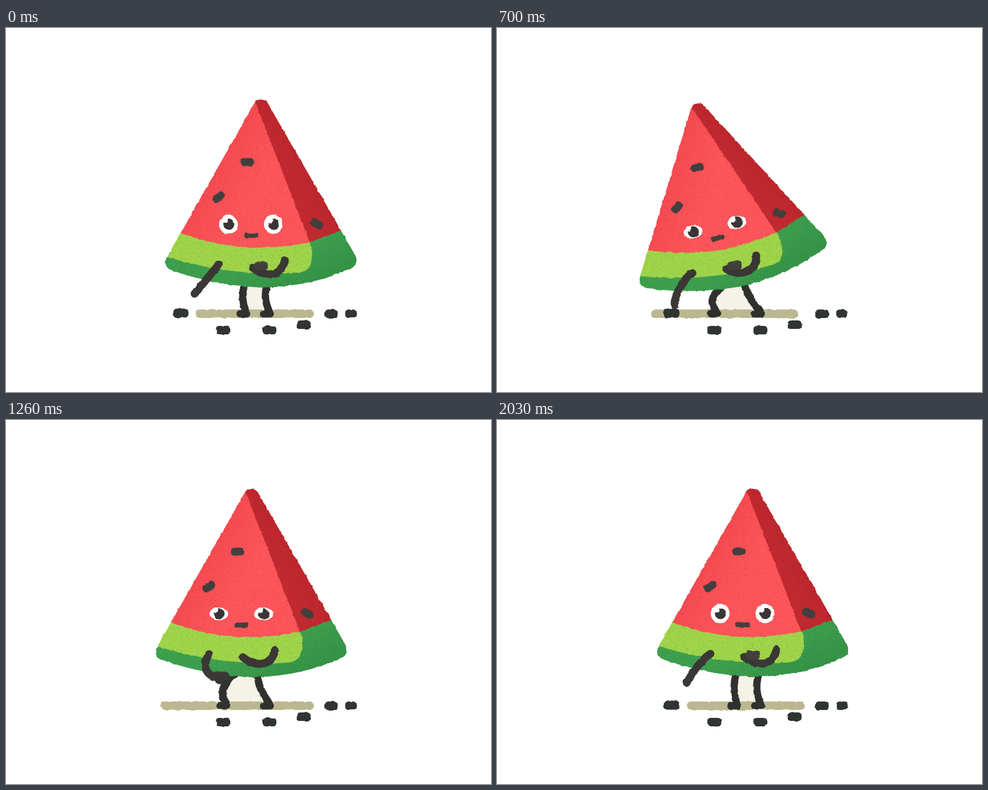
These frames come from a looping animation (800 by 600 pixels, 2100 ms). An HTML page:

```html
<!DOCTYPE html>
<html lang="en">
<head>
<meta charset="utf-8">
<title>Watermelon slice picking up seeds</title>
<style>
html, body { margin: 0; height: 100%; overflow: hidden; background: #fff; }
svg { display: block; width: 800px; height: 600px; }
.limb { fill: none; stroke: #3a3735; stroke-width: 13; stroke-linecap: round; stroke-linejoin: round; }
.leg { stroke: #30312e; stroke-width: 12; }
.seed { fill: #2f3530; }
.pip { fill: #433f3e; }
</style>
</head>
<body>
<svg viewBox="0 0 800 600">
  <defs>
    <filter id="rough" filterUnits="userSpaceOnUse" x="200" y="80" width="420" height="450" color-interpolation-filters="sRGB">
      <feTurbulence id="noise" type="fractalNoise" baseFrequency=".11" numOctaves="2"/>
      <feDisplacementMap in="SourceGraphic" scale="3.5" xChannelSelector="R" yChannelSelector="G"/>
    </filter>
    <filter id="grain" filterUnits="userSpaceOnUse" x="240" y="100" width="360" height="350" color-interpolation-filters="sRGB">
      <feTurbulence type="fractalNoise" baseFrequency=".7" numOctaves="2"/>
      <feColorMatrix values="0 0 0 0 .1  0 0 0 0 .05  0 0 0 0 .05  .7 0 0 0 -.38"/>
      <feComposite in2="SourceGraphic" operator="in" result="specks"/>
      <feMerge><feMergeNode in="SourceGraphic"/><feMergeNode in="specks"/></feMerge>
    </filter>
    <linearGradient id="flesh" gradientUnits="userSpaceOnUse" x1="335" y1="245" x2="400" y2="282">
      <stop stop-color="#f84b51"/><stop offset="1" stop-color="#ff565b"/>
    </linearGradient>
    <linearGradient id="side" gradientUnits="userSpaceOnUse" x1="470" y1="250" x2="505" y2="230">
      <stop stop-color="#c32a30"/><stop offset="1" stop-color="#bd272d"/>
    </linearGradient>
    <linearGradient id="rind" gradientUnits="userSpaceOnUse" x1="500" y1="350" x2="530" y2="420">
      <stop stop-color="#3ea14f"/><stop offset="1" stop-color="#349345"/>
    </linearGradient>
    <clipPath id="slice"><path id="outline" d="M409 125Q412 118 419 118Q429 117 433 126L577 376Q582 390 570 396Q500 428 420 428Q340 424 272 399Q260 394 264 380Z"/></clipPath>
  </defs>
  <g filter="url(#rough)">
    <path id="gap" fill="#f5f2e7"/>
    <path id="shadow" fill="none" stroke="#bbb891" stroke-width="14" stroke-linecap="round"/>
    <path id="leg1" class="limb leg"/>
    <path id="leg2" class="limb leg"/>
    <g id="seeds"></g>
    <g id="body">
      <g clip-path="url(#slice)" filter="url(#grain)">
        <use href="#outline" fill="url(#rind)"/>
        <path fill="#a1d64b" d="M255 374Q330 398 400 403Q440 407 480 404Q502 402 504 382Q507 365 501 353L400 300L270 330Z"/>
        <path fill="url(#flesh)" d="M411 110L280 335Q340 358 400 362Q455 363 501 353Z"/>
        <path fill="url(#side)" d="M409 110L411 122L501 353L565 329L440 105Z"/>
      </g>
      <g id="pips"></g>
      <g id="eyes"></g>
      <rect class="pip" x="393" y="338" width="23" height="8" rx="3"/>
      <path class="limb" d="M460 383C456 400 447 406 434 406Q419 406 407 395"/>
      <rect id="held" class="pip" x="-12" y="-7.5" width="24" height="15" rx="6"/>
    </g>
    <rect id="loose" class="seed" x="-13" y="-7.5" width="26" height="15" rx="6"/>
    <path id="arm" class="limb"/>
  </g>
</svg>
<script>
const LOOP = 2100, STEP = 70, PICK = 980, DROP = 1330, REST = 2030;
const $ = id => document.getElementById(id);
const set = (id, name, value) => $(id).setAttribute(name, value);
const mix = (a, b, u) => a + (b - a) * u;
const ease = (from, to, t) => {
  const u = Math.min(1, Math.max(0, (t - from) / (to - from)));
  return u * u * (3 - 2 * u);
};

// [time, x, y]: reach, press down, lift, tuck in, reach again
const handPath = [[210, 311, 438], [490, 297, 444], [840, 291, 464], [PICK, 291, 464],
  [1260, 362, 422], [1540, 389, 407], [1820, 341, 438], [REST, 313, 433], [LOOP, 311, 438]];

function handAt(t) {
  let [, x, y] = handPath[0];
  for (let i = 1; i < handPath.length; i++) {
    const u = ease(handPath[i - 1][0], handPath[i][0], t);
    if (u > 0) [x, y] = [1, 2].map(c => mix(handPath[i - 1][c], handPath[i][c], u));
  }
  return [x, y];
}

// The seed lies still, rides in the hand, then falls and hops back to its place.
function looseSeed(t, [hx, hy]) {
  if (t <= PICK || t >= REST) return [288, 470, 0];
  if (t < DROP) return [hx - 3, hy + 6, 0];
  const u = (t - DROP) / (REST - DROP);
  const height = u < .2 ? 48 * (1 - 25 * u * u) : 12 * Math.abs(Math.sin(2.5 * Math.PI * (u - .2)));
  return [mix(341, 288, u), 470 - height, 16 * Math.sin(2 * Math.PI * u)];
}

// The elbow sticks out more the closer the hand is to the shoulder.
function armPath([sx, sy], [hx, hy]) {
  const dx = hx - sx, dy = hy - sy, d = Math.hypot(dx, dy);
  const bulge = .62 * Math.sqrt(Math.max(0, 62 * 62 - d * d)) / d;
  const point = u => `${sx + dx * u - dy * bulge} ${sy + dy * u + dx * bulge}`;
  return `M${sx} ${sy}C${point(.2)} ${point(.8)} ${hx} ${hy}`;
}

const seed = (cls, x, y, w, h, angle) =>
  `<rect class="${cls}" x="${-w / 2}" y="${-h / 2}" width="${w}" height="${h}" rx="5.5" transform="translate(${x} ${y}) rotate(${angle})"/>`;

$("seeds").innerHTML = [[358.5, 498, 23], [434.5, 498, 23], [491, 489, 23], [536, 471, 22], [569, 471, 19]]
  .map(([x, y, w]) => seed("seed", x, y, w, 14, 0)).join("");
$("pips").innerHTML = [[398, 221, 0], [350.5, 279, -35], [513, 323, 28]]
  .map(([x, y, angle]) => seed("pip", x, y, 22, 13, angle)).join("");
$("eyes").innerHTML = [367, 441].map(x =>
  `<ellipse class="white" cx="${x}" cy="323.5" rx="15.5" fill="#fff"/>
   <circle cx="${x + .5}" cy="323.5" r="9.2" fill="#3a3635"/>
   <circle cx="${x - 5.5}" cy="317.5" r="4.5" fill="#fff"/>`).join("");

function draw(t) {
  const step = ease(210, 490, t) - ease(1300, 1700, t);
  const bend = ease(280, 910, t) - ease(PICK, 1260, t);
  const swing = ease(1260, 1540, t) - ease(1540, 1820, t);
  const hop = ease(1820, 1925, t) - ease(1925, LOOP, t);
  const squint = ease(140, 280, t) - ease(1540, 1680, t);
  const spread = ease(210, 910, t) - ease(PICK, 1900, t);
  const pass = ease(770, 1190, t) - ease(1260, 1470, t);

  const bx = 421 - 16 * step - 27.5 * bend * bend + 4 * swing + 3 * hop;
  const by = 385 - 4 * step + 7 * bend * bend + swing - 13 * hop;
  const angle = 6.5 * swing - 16 * bend, rad = angle * Math.PI / 180;
  const attach = (x, y) =>
    [bx + x * Math.cos(rad) - y * Math.sin(rad), by + x * Math.sin(rad) + y * Math.cos(rad)];
  set("body", "transform",
    `translate(${bx} ${by}) rotate(${angle}) skewX(${-angle / 10}) translate(-421 -385)`);
  document.querySelectorAll(".white").forEach(e => e.setAttribute("ry", 16 - 5.5 * squint));
  set("shadow", "d", `M${320 - 75 * spread} 471H${501 - 14 * bend + 9 * swing}`);

  const legs = [
    { hip: attach(-28, 38), x: 391 - 33 * step, y: 471 - 7 * Math.sin(Math.PI * step), bulge: 7 + 15 * step },
    { hip: attach(10, 38), x: 430, y: 471, bulge: 9 }
  ];
  legs.forEach((leg, i) => {
    const { hip, x, y, bulge } = leg;
    leg.knee = [(hip[0] + x + 4) / 2 - bulge, (hip[1] + y - 5) / 2];
    set("leg" + (i + 1), "d", `M${hip}Q${leg.knee} ${x + 4} ${y - 5}M${x - 5} ${y}h11`);
  });

  const hand = handAt(t), shoulder = attach(-70, 5), [a, b] = legs;
  const planted = hand[1] > 460 ? `M${shoulder}L${hand}H${a.x}L${a.hip}Z` : "";
  set("gap", "d", `M${a.hip}Q${a.knee} ${a.x + 4} 467H${b.x + 2}Q${b.knee} ${b.hip}Z` + planted);
  set("arm", "d", armPath(shoulder, hand));

  const place = (id, x, y, turn) => set(id, "transform", `translate(${x} ${y}) rotate(${turn})`);
  place("loose", ...looseSeed(t, hand));
  place("held", mix(421, 371, pass), mix(392, 426, pass), 0);
  set("noise", "seed", t / STEP % 3 + 1);
}

let last = -1;
function tick() {
  const t = Math.floor(performance.now() % LOOP / STEP) * STEP;
  if (t !== last) draw(last = t);
  requestAnimationFrame(tick);
}
tick();
</script>
</body>
</html>
```
